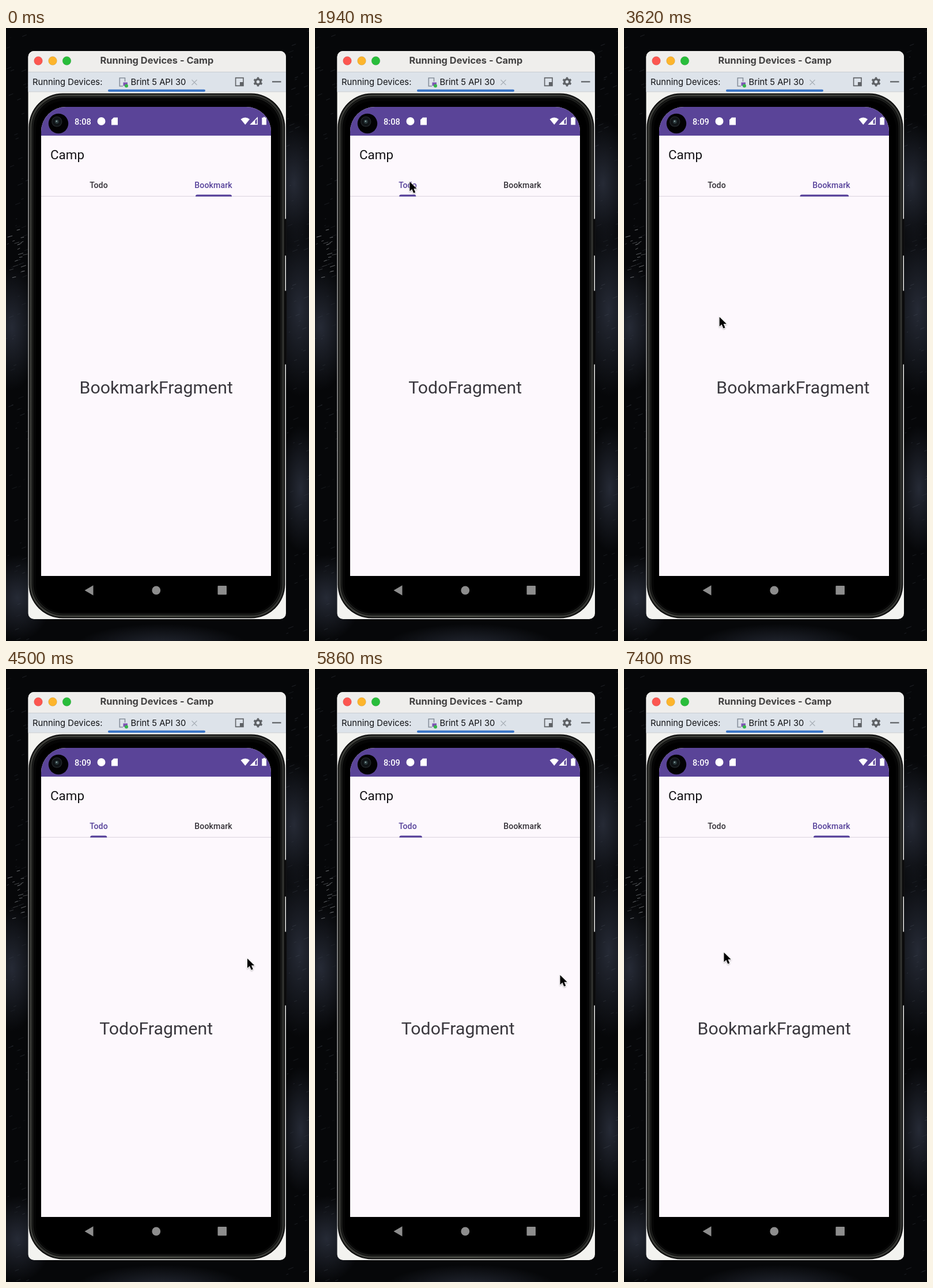
Animation, 526 px wide and 1065 px high, one loop 7.5 s. Source, as an HTML page:

```html
<!DOCTYPE html>
<html lang="en">
<head>
<meta charset="utf-8">
<title>Tabs demo</title>
<style>
  html, body { margin: 0; width: 100%; height: 100%; overflow: hidden; background: #060709; }
  svg { display: block; width: 100%; height: 100%; }
  .ui { font-family: Inter, "Open Sans", sans-serif; font-size: 14.8px; fill: #101114; }
  .app { font-family: Roboto, "Noto Sans", sans-serif; }
  .tab { font-size: 14.1px; font-weight: 500; letter-spacing: .1px; text-anchor: middle; }
  .page { font-size: 30.3px; fill: #3a383e; text-anchor: middle; }
</style>
</head>
<body>
<svg viewBox="0 0 526 1065" preserveAspectRatio="none">
  <defs>
    <radialGradient id="haze">
      <stop offset="0" stop-color="#2b303d" stop-opacity=".85"/>
      <stop offset="1" stop-color="#2b303d" stop-opacity="0"/>
    </radialGradient>
    <linearGradient id="rim" x2="1" y2="0">
      <stop offset="0" stop-color="#3b3c38"/>
      <stop offset=".5" stop-color="#4b4d46"/>
      <stop offset="1" stop-color="#343532"/>
    </linearGradient>
    <clipPath id="screen"><path d="M61 952V180a43 43 0 0 1 43-43H417a43 43 0 0 1 43 43V952Z"/></clipPath>
    <clipPath id="tabs"><rect x="61" y="252" width="399" height="40"/></clipPath>
    <filter id="shadow" x="-50%" y="-50%" width="200%" height="200%">
      <feDropShadow dx="0" dy="1.2" stdDeviation="1.2" flood-opacity=".35"/>
    </filter>
  </defs>

  <rect width="526" height="1065" fill="#060709"/>
  <g id="backdrop"></g>

  <!-- Window -->
  <rect x="38.5" y="40" width="447.5" height="987" rx="10" fill="#f3f3f0"/>
  <path d="M38.5 76V50a10 10 0 0 1 10-10H476a10 10 0 0 1 10 10V76Z" fill="#efeeec"/>
  <path d="M38.5 76.5H486V110.5H38.5Z" fill="#dde3ea"/>
  <path d="M38.5 76.5H486M38.5 110.8H486" stroke="#c9cdd2"/>
  <g stroke-opacity=".12" stroke="#000" stroke-width=".8">
    <circle cx="56" cy="57" r="7.4" fill="#fc5650"/>
    <circle cx="81" cy="57" r="7.4" fill="#fdb52c"/>
    <circle cx="105.5" cy="57" r="7.4" fill="#29bd3b"/>
  </g>
  <text class="ui" x="262" y="62" text-anchor="middle" style="font-size:16.4px;font-weight:700;fill:#424141">Running Devices - Camp</text>
  <text class="ui" x="46" y="99">Running Devices:</text>
  <text class="ui" x="216.5" y="99">Brint 5 API 30</text>
  <rect x="177" y="106.7" width="169" height="4" rx="2" fill="#3974c6"/>
  <g fill="none" stroke="#87909b" stroke-width="1.6">
    <path d="M203 101H197.3V86.8H206.5V93"/>
    <path d="M322.5 90l9 9m0-9l-9 9" stroke="#a9b0b8" stroke-width="1.2"/>
    <path d="M398.6 86.6H412V100.4H398.6Z" stroke="#5f6266"/>
  </g>
  <rect x="203.5" y="94.5" width="7.5" height="6" fill="#7f54b4"/>
  <circle cx="209" cy="100.6" r="3" fill="#35b54a"/>
  <path d="M406 94H412V100.5H406ZM462 92.2H477.5V94.6H462Z" fill="#5f6266"/>
  <g transform="translate(437.5 93.5)" stroke="#5f6266" fill="none">
    <circle r="4.5" stroke-width="3.4"/>
    <g id="cogs" stroke-width="3.4"></g>
  </g>

  <!-- Phone -->
  <path d="M484.5 332H486.7V395H484.5ZM484 457H487V584H484Z" fill="#08080a" stroke="#151517"/>
  <rect x="39.5" y="113.5" width="445" height="912" rx="59" fill="#0b0b0b"/>
  <rect x="43" y="117" width="438" height="905" rx="56" fill="none" stroke="url(#rim)" stroke-width="3"/>
  <rect x="46.5" y="120.5" width="431" height="898" rx="53" fill="#050505" stroke="#1d1e1c" stroke-width="2"/>
  <rect x="52" y="127" width="420" height="888" rx="48" fill="#000"/>

  <g clip-path="url(#screen)" class="app">
    <rect x="61" y="137" width="399" height="815" fill="#fdf8fd"/>
    <rect x="61" y="137" width="399" height="50" fill="#5a4498"/>
    <text id="clock" x="119" y="167.6" font-size="14.6" font-weight="500" fill="#fff"></text>
    <g fill="#fff">
      <circle cx="165.5" cy="162" r="7"/>
      <path d="M187 155.5H194V168.5H183V159.5Z"/>
      <path d="M407.5 158.6Q415.3 152.3 423 158.6L415.3 168Z"/>
      <path d="M446 155.8H446.8V154.6H449.6V155.8H452V168.3H444.3V155.8Z"/>
      <path d="M425 167.3H436.3V156Z" fill="none" stroke="#fff" stroke-width="1.4"/>
      <path d="M424.5 168L432.5 160V168Z"/>
    </g>
    <text x="77" y="228.3" font-size="22.4" fill="#131215">Camp</text>
    <circle id="ripple" fill="#5a4398" clip-path="url(#tabs)"/>
    <path d="M61 292.3H460" stroke="#d9d3dc"/>
    <path id="indicator" fill="#553f99"/>
    <text id="todoTab" class="tab" x="161" y="277.8">Todo</text>
    <text id="markTab" class="tab" x="360" y="277.8">Bookmark</text>
    <text id="todoPage" class="page" y="635">TodoFragment</text>
    <text id="markPage" class="page" y="635">BookmarkFragment</text>
  </g>

  <circle cx="91" cy="166" r="17.2" fill="#020203"/>
  <circle cx="88.3" cy="162.7" r="8.5" fill="#101417" stroke="#24292c" stroke-width="1.3"/>
  <circle cx="88.3" cy="162.7" r="3.4" fill="#2b3a3d"/>
  <circle cx="87.8" cy="162" r="1.2" fill="#91a4a5"/>
  <g fill="#8d8d8d">
    <path d="M136.5 977L151.5 968.3V985.7Z"/>
    <circle cx="260.8" cy="977" r="7.4"/>
    <rect x="367.5" y="969" width="15.5" height="15.5" rx="1"/>
  </g>

  <path id="cursor" d="M0 0V16.6L3.9 13 6.8 19.8 9.8 18.5 7 12H12.2Z" stroke="#fff" stroke-width="1.3" paint-order="stroke" filter="url(#shadow)"/>
</svg>

<script>
const LOOP = 7500, PAGE_W = 399, CENTER = 260.7;
const $ = id => document.getElementById(id);
const clamp01 = v => Math.min(1, Math.max(0, v));
const lerp = (a, b, k) => a + (b - a) * k;
const progress = (t, start, length) => clamp01((t - start) / length);
const decelerate = k => 1 - (1 - k) ** 2;
const accelerate = k => k ** 2;
const smooth = k => k * k * (3 - 2 * k);

// cubic-bezier(.4, 0, .2, 1)
function standard(x) {
  let lo = 0, hi = 1;
  for (let i = 0; i < 20; i++) {
    const u = (lo + hi) / 2, v = 1 - u;
    if (1.2 * v * v * u + .6 * v * u * u + u ** 3 < x) lo = u; else hi = u;
  }
  return smooth(lo);
}

// Pointer stops: time, x, y, easing into the stop
const STOPS = [
  [260, 330, 420], [860, 162, 267], [1900, 162, 267], [2480, 330, 267],
  [2780, 330, 267], [3440, 120, 502], [3620, 164, 502, accelerate],
  [3900, 405, 503, decelerate], [4080, 419, 503], [5450, 419, 503],
  [5690, 454, 538], [5860, 427, 532, accelerate],
  [6180, 190, 500, decelerate], [6400, 173.5, 492.5], [LOOP, 173.5, 492.5]
];

function pointer(t) {
  const i = STOPS.findIndex(s => s[0] >= t);
  if (i < 1) return STOPS[0].slice(1, 3);
  const a = STOPS[i - 1], b = STOPS[i];
  const k = (b[3] || smooth)((t - a[0]) / (b[0] - a[0]));
  return [lerp(a[1], b[1], k), lerp(a[2], b[2], k)];
}

const TAPS = [
  { press: 940, release: 1017, x: 162, tabX: 160.7, to: 0 },
  { press: 2630, release: 2720, x: 331, tabX: 360.3, to: 1 }
];
const DRAGS = [
  { start: 3440, release: 3880, anchor: 133, to: 0 },
  { start: 5690, release: 6150, anchor: 438, to: 1 }
];

// Positions run from 0 (Todo) to 1 (Bookmark)
function pagerState(t) {
  const state = { page: 1, bar: 1, selected: 1 };
  for (const { release, to } of TAPS) {
    if (t < release) continue;
    state.page = lerp(1 - to, to, decelerate(progress(t, release, 185)));
    state.bar = lerp(1 - to, to, standard(progress(t, release, 300)));
    state.selected = to;
  }
  for (const { start, release, anchor, to } of DRAGS) {
    if (t < start) continue;
    const direction = to ? -1 : 1;
    const moved = clamp01(direction * (pointer(Math.min(t, release))[0] - anchor) / PAGE_W);
    const done = lerp(moved, 1, decelerate(progress(t, release, 230)));
    state.page = state.bar = to ? done : 1 - done;
    if (t >= release) state.selected = to;
  }
  return state;
}

function drawRipple(t) {
  const tap = TAPS.find(({ press }) => t >= press && t < press + 470);
  if (!tap) return $('ripple').setAttribute('opacity', 0);
  const k = standard(progress(t, tap.press, 225));
  const fade = progress(t, tap.press, 40) * (1 - progress(t, tap.press + 320, 150));
  setAttrs('ripple', { cx: lerp(tap.x, tap.tabX, k), cy: 272, r: lerp(60, 101.7, k), opacity: .16 * fade });
}

function setAttrs(id, attrs) {
  for (const name in attrs) $(id).setAttribute(name, attrs[name]);
}

function render(t) {
  const { page, bar, selected } = pagerState(t);
  const angle = bar * Math.PI / 2;
  const left = lerp(146.2, 329, 1 - Math.cos(angle));
  const right = lerp(175.3, 392, Math.sin(angle));
  setAttrs('indicator', { d: `M${left} 292.8Q${left} 289.6 ${left + 3} 289.6H${right - 3}Q${right} 289.6 ${right} 292.8Z` });
  setAttrs('todoTab', { fill: selected ? '#333036' : '#56419a' });
  setAttrs('markTab', { fill: selected ? '#56419a' : '#333036' });
  setAttrs('todoPage', { x: CENTER - page * PAGE_W });
  setAttrs('markPage', { x: CENTER + (1 - page) * PAGE_W });
  $('clock').textContent = t < 1960 ? '8:08' : '8:09';
  drawRipple(t);
  const [x, y] = pointer(t);
  setAttrs('cursor', { transform: `translate(${x} ${y})`, opacity: t < STOPS[0][0] ? 0 : 1 });
}

function buildBackdrop() {
  let seed = 11;
  const random = () => (seed = seed * 16807 % 2147483647) / 2147483647;
  const hazes = [[10, 520, 50, 110], [510, 490, 55, 150], [20, 990, 60, 75], [500, 270, 50, 110], [512, 800, 40, 110], [270, 1075, 150, 40]];
  let out = hazes.map(([x, y, rx, ry]) =>
    `<ellipse cx="${x}" cy="${y}" rx="${rx}" ry="${ry}" fill="url(#haze)"/>`).join('');
  for (let i = 0; i < 150; i++) {
    const x = random() < .5 ? random() * 38 : 486 + random() * 40;
    const y = random() * 1065, length = 2 + random() * 7;
    out += `<path d="M${x} ${y}l${length} ${-length * .4}" stroke="#59606c" opacity="${.1 + random() * .25}"/>`;
  }
  for (let i = 0; i < 20; i++) {
    const x = random() * 32, y = 345 + random() * 105;
    out += `<path d="M${x} ${y}l${3 + random() * 6} ${-1 - random() * 2}" stroke="#a5a9ad" opacity="${.25 + random() * .45}"/>`;
  }
  $('backdrop').innerHTML = out;
}

buildBackdrop();
$('cogs').innerHTML = [0, 60, 120, 180, 240, 300]
  .map(a => `<path d="M0 -4.5V-8" transform="rotate(${a})"/>`).join('');

const begin = performance.now();
function tick() {
  render((performance.now() - begin) % LOOP);
  requestAnimationFrame(tick);
}
tick();
</script>
</body>
</html>
```
